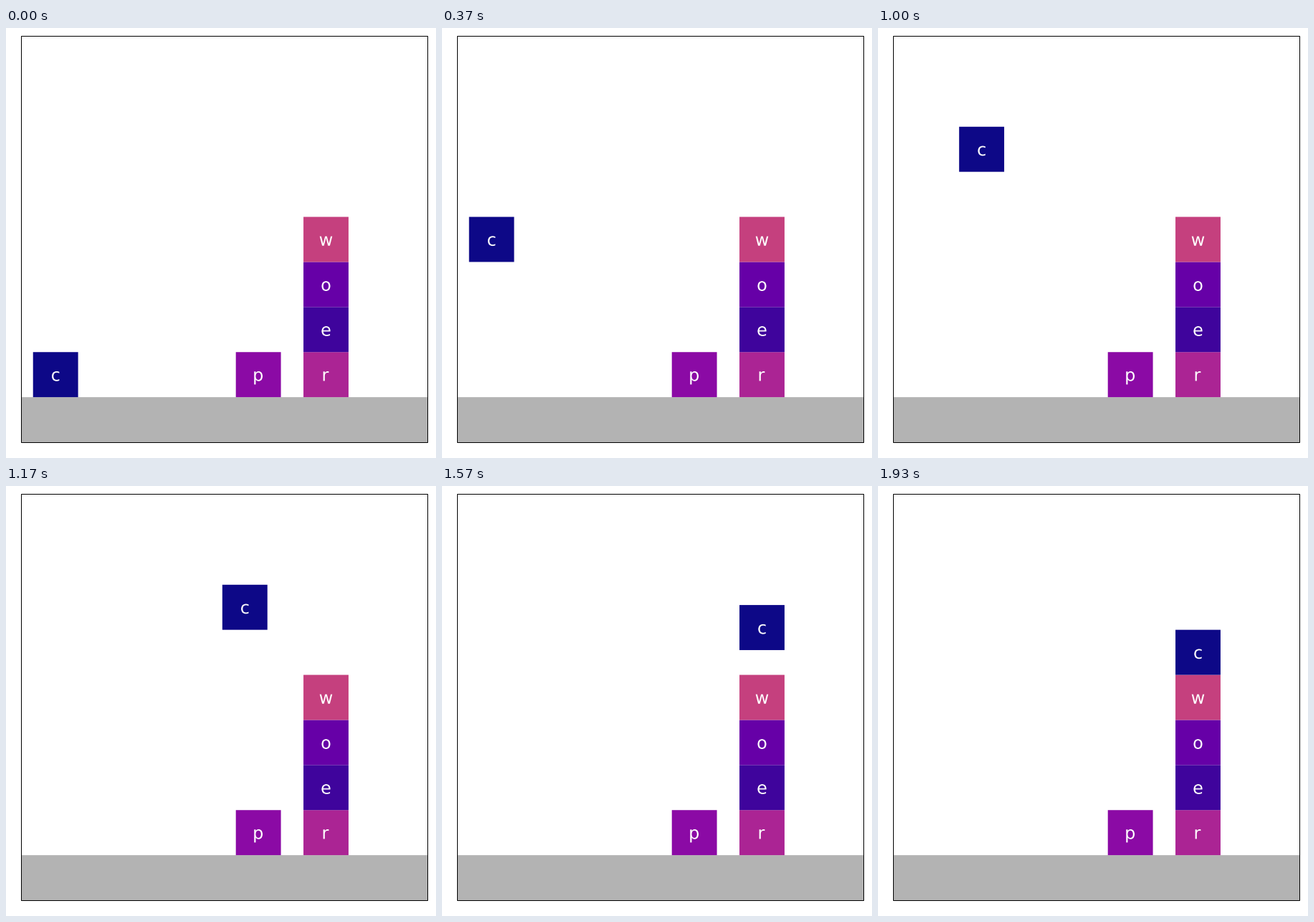
These frames come from a looping animation (600x600 px, 1960 ms). A matplotlib script:

```python
import matplotlib.pyplot as plt
from matplotlib.animation import FuncAnimation
from matplotlib.patches import PathPatch, Rectangle
from matplotlib.textpath import TextPath
from matplotlib.transforms import Affine2D

SIZE = 600
LEFT, BOTTOM, SIDE = 22, 22, 566    # plot area in pixels, y pointing up
UNIT = SIDE / 9                     # edge of one block
TICK_MS, LOOP_MS = 10, 1960
FONT_PX = 24
MID_HEIGHT = 0.365                  # middle of a text line above its baseline, in em

plt.rcParams["font.family"] = "DejaVu Sans"
fig = plt.figure(figsize=(SIZE / 100, SIZE / 100), dpi=100, facecolor="white")
ax = fig.add_axes([0, 0, 1, 1])
ax.set(xlim=(0, SIZE), ylim=(0, SIZE))
ax.axis("off")


def add_box(x, y, width, height, **style):
    return ax.add_patch(Rectangle((x, y), width, height, snap=False, **style))


def add_glyph(letter, x, y):
    path = TextPath((0, 0), letter, size=FONT_PX)
    ink = path.get_extents()
    place = Affine2D().translate(x - (ink.x0 + ink.x1) / 2, y - MID_HEIGHT * FONT_PX)
    return ax.add_patch(PathPatch(place.transform_path(path), fc="white", lw=0,
                                  snap=False, zorder=3))


def add_block(letter, shade, column, level):
    x = LEFT + (column + 0.25) * UNIT
    y = BOTTOM + (level + 1) * UNIT
    square = add_box(x, y, UNIT, UNIT, fc=plt.cm.plasma(shade * 2 / 21), lw=0, zorder=2)
    return square, add_glyph(letter, x + UNIT / 2, y + UNIT / 2)


add_box(LEFT, BOTTOM, SIDE, UNIT, fc="#b3b3b3", lw=0)
add_box(LEFT - 0.5, BOTTOM - 0.5, SIDE + 1, SIDE + 1,
        fill=False, ec="black", lw=0.72, zorder=4)

add_block("p", 3, 4.5, 0)
for level, (letter, shade) in enumerate([("r", 4), ("e", 1), ("o", 2), ("w", 5)]):
    add_block(letter, shade, 6, level)
mover = add_block("c", 0, 0, 0)


def clamp(value):
    return min(max(value, 0), 1)


def offset(step):
    """Shift of the carried block, in blocks, after so many 1/30 s steps."""
    rise = clamp((step + 1) / 20) if step >= 1 else 0
    slide = clamp((step - 28) / 10) if step >= 30 else 0
    drop = clamp((step - 38) / 20)
    return 6 * slide, 5 * rise - drop


def update(tick):
    # Steps of 1/30 s, rounded to the nearest tick.
    dx, dy = offset((30 * tick + 15) // 100)
    shift = Affine2D().translate(dx * UNIT, dy * UNIT) + ax.transData
    for artist in mover:
        artist.set_transform(shift)
    return mover


anim = FuncAnimation(fig, update, frames=LOOP_MS // TICK_MS, interval=TICK_MS,
                     repeat=True, repeat_delay=0, blit=False)
plt.show()
```
